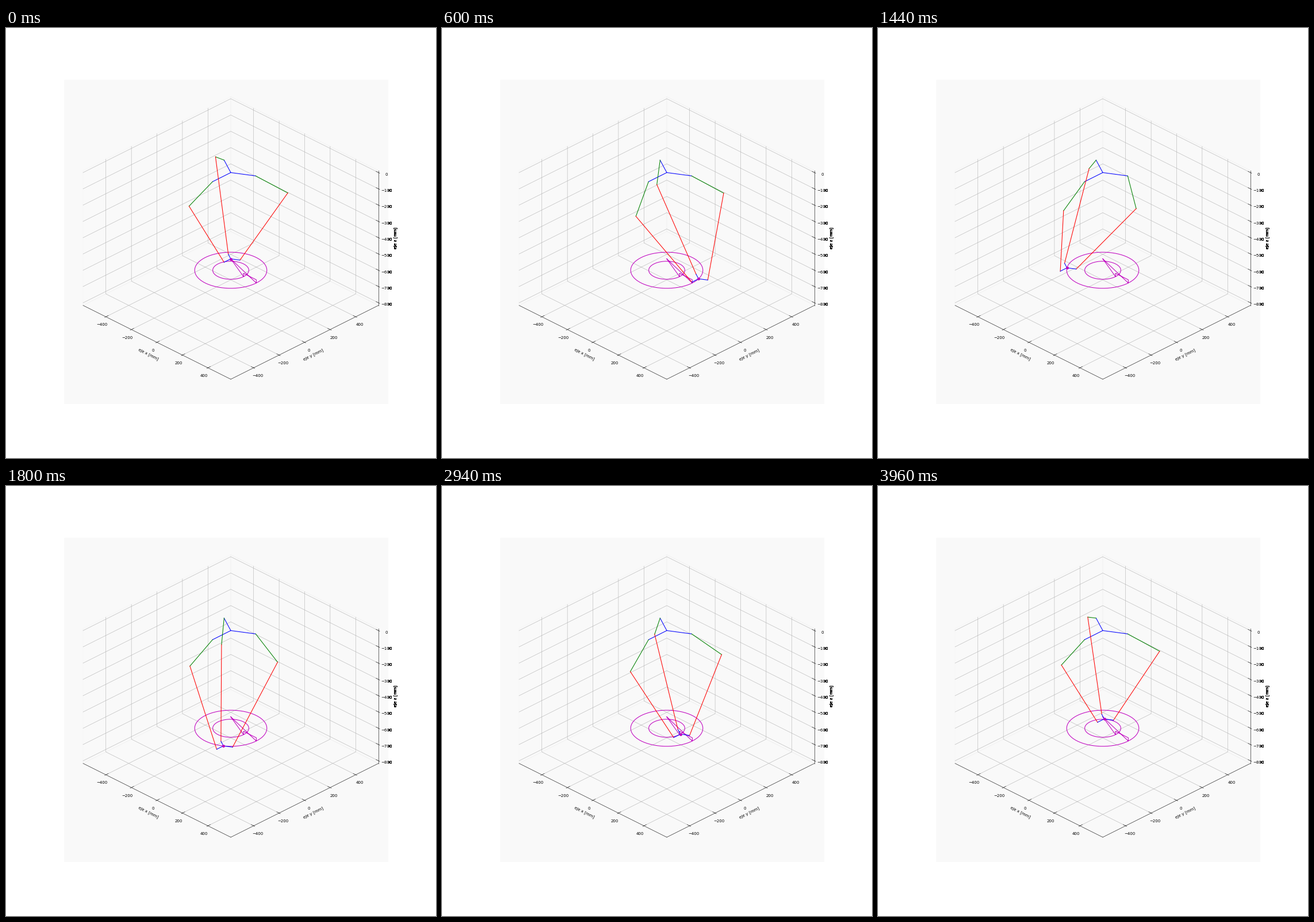
A matplotlib script that plays this animation: 748x748 px, repeating every 4020 ms.

```python
import numpy as np
import matplotlib.pyplot as plt
from matplotlib.animation import FuncAnimation
from matplotlib.patches import Rectangle

SIZE, DPI = 748, 50
FRAMES, INTERVAL = 67, 60

# Isometric projection, pixels per mm
K, KZ = 0.2219, 0.2832
CX, CY = 391.0, 251.5
LIM = 579
Z_LO, Z_HI = -815.7, 12.4

# Delta robot geometry in mm
R_BASE, R_PLATE = 143, 52.8
L_ARM, L_ROD = 200, 528.5
ARM_ANGLES = np.radians([-90, 30, 150])

HOME = (0, 0, -530)
Z_WORK, Z_LIFT = -600, -580
R_OUT, R_IN = 200, 100

# Straight moves: frame time and position
T_OUT, T_LIFT, T_IN, T_BACK, T_END = 8.83, 33.97, 48.86, 61.45, 66.6
MOVES = [
    (0, HOME),
    (T_OUT, (R_OUT, 0, Z_WORK)),
    (T_LIFT, (R_OUT, 0, Z_WORK)),
    (36.1, (R_OUT, 0, Z_LIFT)),
    (46.75, (R_IN, 0, Z_LIFT)),
    (T_IN, (R_IN, 0, Z_WORK)),
    (T_BACK, (R_IN, 0, Z_WORK)),
    (T_END, HOME),
]


def project(points):
    x, y, z = np.asarray(points, float).T
    return CX + K * (x + y), CY + K / 2 * (x - y) - KZ * z


def circle(radius, angle):
    angle = np.asarray(angle)
    return np.stack([radius * np.cos(angle), radius * np.sin(angle),
                     np.full(angle.shape, Z_WORK)], -1)


def effector(t):
    if T_OUT <= t < T_LIFT:
        return circle(R_OUT, 0.25 * (t - T_OUT))
    if T_IN <= t < T_BACK:
        return circle(R_IN, 0.5 * (t - T_IN))
    times, points = zip(*MOVES)
    return np.array([np.interp(t, times, axis) for axis in zip(*points)])


def leg(pos, phi):
    """Base joint, elbow and platform joint of one leg."""
    out = np.array([np.cos(phi), np.sin(phi), 0])
    side = np.array([-np.sin(phi), np.cos(phi), 0])
    a = pos @ out + R_PLATE - R_BASE
    b = -pos[2]
    w = pos @ side
    c = (a**2 + b**2 + w**2 + L_ARM**2 - L_ROD**2) / (2 * L_ARM)
    theta = np.arctan2(b, a) - np.arccos(np.clip(c / np.hypot(a, b), -1, 1))
    base = R_BASE * out
    elbow = base + L_ARM * (np.cos(theta) * out - np.sin(theta) * np.array([0, 0, 1]))
    return base, elbow, pos + R_PLATE * out


fig = plt.figure(figsize=(SIZE / DPI, SIZE / DPI), dpi=DPI, facecolor="white")
ax = fig.add_axes([0, 0, 1, 1])
ax.set_xlim(0, SIZE)
ax.set_ylim(SIZE, 0)
ax.axis("off")
ax.add_patch(Rectangle((101, 90), 564, 564, fc="#f9f9f9", ec="none", zorder=0))
margin = Rectangle((665, 0), SIZE - 665, SIZE, transform=ax.transData)


def line3(points, color, lw=1.5, **kw):
    return ax.plot(*project(points), color=color, lw=lw, **kw)[0]


def label(x, y, s, **kw):
    return ax.text(x, y, s, fontsize=10, family="DejaVu Sans", ha="center", **kw)


def heavy_label(x, y, s, **kw):
    """Text overdrawn many times right of the plot area."""
    label(x, y, s, **kw)
    for _ in range(7):
        t = label(x, y, s, clip_on=True, **kw)
        t.set_clip_path(margin)


def num(v):
    return str(v).replace("-", "\u2212")


def draw_box():
    lo, hi = -LIM, LIM
    panes = [
        ([(lo, lo, Z_LO), (lo, hi, Z_LO), (lo, hi, Z_HI), (lo, lo, Z_HI)], 0.95),
        ([(lo, hi, Z_LO), (hi, hi, Z_LO), (hi, hi, Z_HI), (lo, hi, Z_HI)], 0.90),
        ([(lo, lo, Z_LO), (hi, lo, Z_LO), (hi, hi, Z_LO), (lo, hi, Z_LO)], 0.925),
    ]
    for corners, gray in panes:
        line3(corners + corners[:1], str(gray), 1, alpha=0.5)

    grid = dict(color="#b0b0b0", lw=0.8)
    axis = dict(color="black", lw=0.8)
    ticks = range(-400, 401, 200)
    heights = range(-800, 1, 100)
    for v in ticks:
        line3([(v, lo, Z_LO), (v, hi, Z_LO), (v, hi, Z_HI)], **grid)
        line3([(hi, v, Z_LO), (lo, v, Z_LO), (lo, v, Z_HI)], **grid)
    for z in heights:
        line3([(lo, lo, z), (lo, hi, z), (hi, hi, z)], **grid)

    line3([(lo, lo, Z_LO), (hi, lo, Z_LO)], **axis)
    line3([(hi, lo, Z_LO), (hi, hi, Z_LO)], **axis)
    line3([(hi, hi, Z_LO), (hi, hi, Z_HI)], **axis)

    inner, outer = LIM / 30, LIM / 60
    for v in ticks:
        line3([(v, lo + inner, Z_LO), (v, lo - outer, Z_LO)], **axis)
        x, y = project([(v, lo, Z_LO)])
        label(x[0] - 7, y[0] + 16, num(v), va="baseline")
        line3([(hi - inner, v, Z_LO), (hi + outer, v, Z_LO)], **axis)
        x, y = project([(hi, v, Z_LO)])
        label(x[0] + 6.8, y[0] + 16, num(v), va="baseline")
    for z in heights:
        line3([(hi - inner, hi, z), (hi + outer, hi, z)], **axis)
        x, y = project([(hi, hi, z)])
        heavy_label(x[0] + 14, y[0] + 5.2, num(z), va="baseline")

    turned = dict(va="center", rotation_mode="anchor")
    label(248, 568, "eje x [mm]", rotation=-26.6, **turned)
    label(535, 568, "eje y [mm]", rotation=26.6, **turned)
    heavy_label(677.5, 365, "eje z [mm]", rotation=90, **turned)


draw_box()

turn = np.linspace(0, 2 * np.pi, 127)
track = np.vstack([[HOME], circle(R_OUT, turn), [(R_OUT, 0, Z_LIFT)],
                   [(R_IN, 0, Z_LIFT)], circle(R_IN, turn), [HOME]])
line3(track, "m")

legs = []
for phi in ARM_ANGLES:
    line3([(0, 0, 0), (R_BASE * np.cos(phi), R_BASE * np.sin(phi), 0)], "b")
    legs.append([ax.plot([], [], color=c, lw=1.5)[0] for c in "grb"])
tip, = ax.plot([], [], "mo", ms=6)


def update(i):
    pos = effector(i)
    for phi, (arm, rod, plate) in zip(ARM_ANGLES, legs):
        base, elbow, joint = leg(pos, phi)
        arm.set_data(*project([base, elbow]))
        rod.set_data(*project([elbow, joint]))
        plate.set_data(*project([joint, pos]))
    tip.set_data(*project([pos]))
    return [tip, *sum(legs, [])]


anim = FuncAnimation(fig, update, frames=FRAMES, interval=INTERVAL,
                     repeat=True, repeat_delay=0, blit=False)
plt.show()
```
